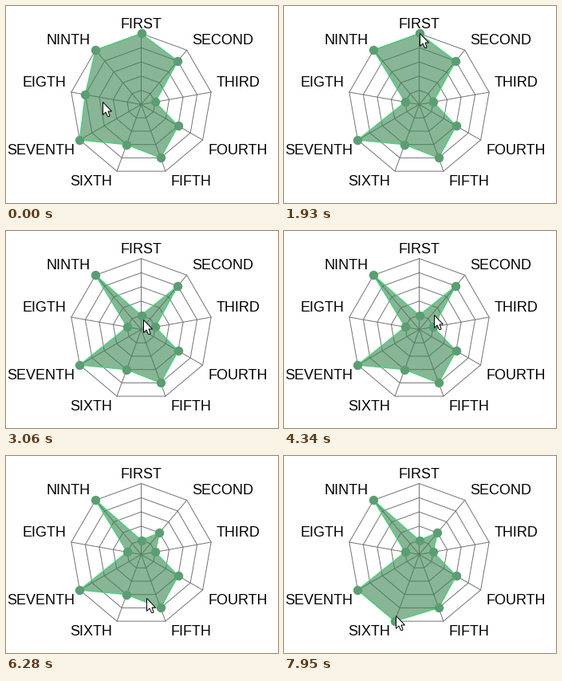
Recreate the animation shown at these times as a matplotlib script. Size 341 px wide and 247 px high, loop 8 s.

```python
import numpy as np
import matplotlib.pyplot as plt
from matplotlib.animation import FuncAnimation

W, H, DPI = 341, 247, 100
PX = 72 / DPI              # points per pixel
LOOP, STEP = 8000, 20
CENTER, RADIUS = np.array([169.5, 123.5]), 89
ANGLES = np.radians(np.arange(9) * 40)
SPOKES = np.column_stack([np.sin(ANGLES), -np.cos(ANGLES)])

LABELS = [
    ("FIRST", 169.5, 28, "center"), ("SECOND", 233.2, 48, "left"),
    ("THIRD", 264, 101, "left"), ("FOURTH", 253.5, 186, "left"),
    ("FIFTH", 207, 225, "left"), ("SIXTH", 133, 225, "right"),
    ("SEVENTH", 86, 186, "right"), ("EIGTH", 75.5, 101, "right"),
    ("NINTH", 105.5, 48, "right"),
]

START = [1, .8, .2, .6, .8, .6, 1, .8, 1]
DROPS = [(340, 7, .2), (3060, 0, .2), (5000, 1, .4), (7400, 5, 1)]

# pointer moves: first step, last step, number of steps, waypoints
HOME = (121, 120)
MOVES = [
    (60, 340, 6, [(138, 121), (152, 121)]),
    (1020, 1020, 1, [(152, 116)]),
    (1080, 1810, 11, [(168, 90), (181, 55), (175, 20), (171, 34)]),
    (1930, 1930, 1, [(170, 34)]),
    (2430, 3060, 12, [(171, 75), (172, 111)]),
    (3930, 4520, 11, [(175, 117), (184, 109), (192, 100)]),
    (4820, 4820, 1, [(193, 100)]),
    (5810, 5810, 1, [(196, 100)]),
    (5860, 6560, 13, [(214, 122), (200, 160), (165, 187), (130, 196)]),
    (6680, 6860, 4, [(133, 191), (138, 193)]),
    (6920, 7090, 3, [(140, 203)]),
    (7950, 7950, 1, [(140, 200)]),
]

ARROW = np.array([(0, 0), (0, 16), (3.5, 12.5), (6, 18), (8, 18),
                  (8.5, 17), (6.5, 11.5), (11, 11.5)]) + .5


def pointer(t):
    pos = HOME
    for first, last, n, way in MOVES:
        if t < first:
            break
        gap = (last - first) / max(n - 1, 1)
        k = n if t >= last else int((t - first) / gap) + 1
        u = k / n
        if n > 4:
            u = u * u * (3 - 2 * u)
        pts = np.array([pos] + way)
        grid = np.linspace(0, 1, len(pts))
        now = np.round([np.interp(u, grid, pts[:, i]) for i in (0, 1)])
        if t < last:
            return now
        pos = way[-1]
    return np.array(pos)


def corners(t):
    vals = np.array(START, float)
    for when, axis, value in DROPS:
        if t >= when:
            vals[axis] = value
    return CENTER + RADIUS * vals[:, None] * SPOKES


fig = plt.figure(figsize=(W / DPI, H / DPI), dpi=DPI, facecolor="white")
ax = fig.add_axes([0, 0, 1, 1])
ax.set_xlim(0, W)
ax.set_ylim(H, 0)
ax.axis("off")

web = dict(color="#757575", lw=PX, snap=False, zorder=1)
for level in np.arange(1, 6) / 5:
    ring = CENTER + RADIUS * level * SPOKES
    ax.plot(*np.vstack([ring, ring[:1]]).T, **web)
for spoke in SPOKES:
    ax.plot(*np.array([CENTER, CENTER + RADIUS * spoke]).T, **web)

for name, x, y, side in LABELS:
    ax.text(x, y, name, ha=side, va="baseline", fontsize=18 * PX,
            family="Liberation Sans", color="black", zorder=2)

area, = ax.fill(*corners(0).T, fc=(57 / 255, 133 / 255, 80 / 255, .6),
                ec="#4fd07f", lw=1.5 * PX, joinstyle="round", snap=False, zorder=3)
dots, = ax.plot(*corners(0).T, "o", ms=11.4 * PX, mfc="#5a9e72", mew=0,
                snap=False, zorder=4)
arrow, = ax.fill(*ARROW.T, fc="white", ec="black", lw=PX,
                 joinstyle="miter", snap=False, zorder=5)


def draw(i):
    t = i * STEP + STEP / 2
    pts = corners(t)
    area.set_xy(pts)
    dots.set_data(*pts.T)
    arrow.set_xy(ARROW + pointer(t))
    return area, dots, arrow


anim = FuncAnimation(fig, draw, frames=LOOP // STEP, interval=STEP,
                     repeat=True, repeat_delay=0)
plt.show()
```
